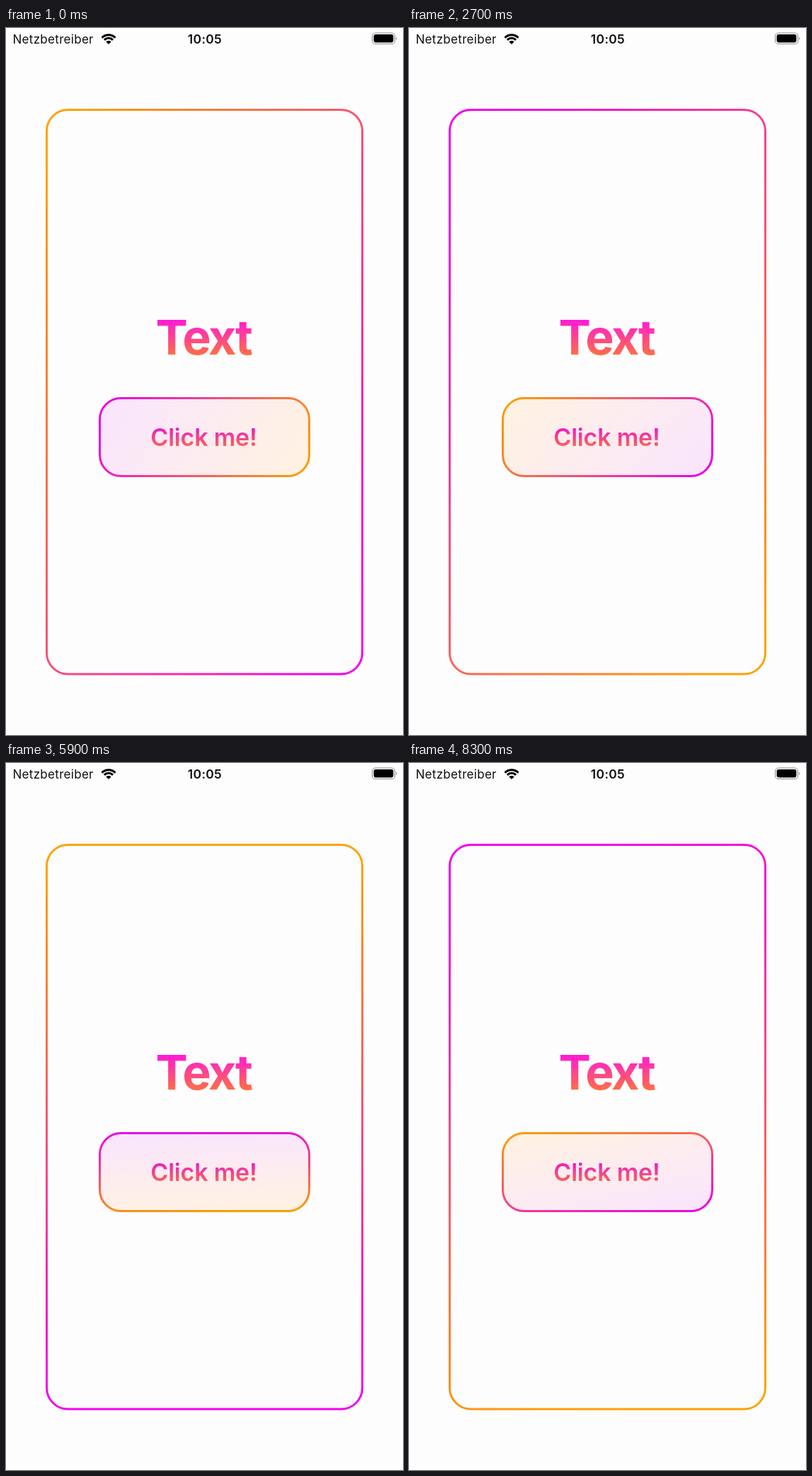
An HTML page that plays this animation: 561 px wide and 998 px high, repeating every 8.5 s.

```html
<!DOCTYPE html>
<html lang="en">
<head>
<meta charset="utf-8">
<title>Rotating gradient borders</title>
<style>
  html, body { margin: 0; width: 100%; height: 100%; overflow: hidden; background: #fefdfe; }
  svg { display: block; width: 561px; height: 998px; font-family: Inter, Roboto, sans-serif; }
  .bar { font-size: 17px; letter-spacing: .3px; fill: #111; }
  .bold { font-weight: 600; font-size: 17.5px; }
  .title { font-size: 68px; font-weight: 700; letter-spacing: -2.4px; }
  .label { font-size: 34px; font-weight: 600; letter-spacing: -.2px; }
  .mid { text-anchor: middle; }
</style>
</head>
<body>
<svg viewBox="0 0 561 998">
  <defs>
    <linearGradient id="cardLine" gradientUnits="userSpaceOnUse">
      <stop offset=".05" stop-color="#ffa200"/><stop offset=".95" stop-color="#f300ec"/>
    </linearGradient>
    <linearGradient id="btnLine" gradientUnits="userSpaceOnUse">
      <stop offset=".05" stop-color="#fa9d08"/><stop offset=".95" stop-color="#ea04e2"/>
    </linearGradient>
    <linearGradient id="btnFill" gradientUnits="userSpaceOnUse">
      <stop offset=".03" stop-color="#fff2e1"/><stop offset=".97" stop-color="#fae5fe"/>
    </linearGradient>
    <linearGradient id="titleInk" gradientUnits="userSpaceOnUse" x1="0" x2="0" y1="404" y2="478">
      <stop stop-color="#ff0cf0"/><stop offset="1" stop-color="#ff8a14"/>
    </linearGradient>
    <linearGradient id="labelInk" gradientUnits="userSpaceOnUse" x1="0" x2="0" y1="558" y2="604">
      <stop stop-color="#ea0ae0"/><stop offset="1" stop-color="#ff8a20"/>
    </linearGradient>
  </defs>

  <text class="bar" x="9.5" y="21.5">Netzbetreiber</text>
  <g fill="none" stroke="#000" stroke-width="3">
    <path d="M135.5 17.1 A13.4 13.4 0 0 1 154.5 17.1" transform="translate(0 -3.4)"/>
    <path d="M138.9 16.9 A8.6 8.6 0 0 1 151.1 16.9"/>
  </g>
  <path d="M145 23 L141.4 19.4 A5.1 5.1 0 0 1 148.6 19.4 Z"/>
  <text class="bar bold mid" x="281" y="21.7">10:05</text>
  <rect x="517.5" y="7" width="32" height="15.5" rx="4.6" fill="none" stroke="#8e8e90" stroke-width="1.1"/>
  <rect x="519.6" y="9.1" width="27.8" height="11.3" rx="2.8"/>
  <path d="M551.2 12.2 Q553.6 14.7 551.2 17.2 Z" fill="#8e8e90"/>

  <rect x="57.5" y="115.5" width="446" height="796.5" rx="30" fill="none" stroke="url(#cardLine)" stroke-width="3"/>
  <text class="title mid" x="279" y="461" fill="url(#titleInk)">Text</text>
  <g id="button">
    <rect x="132.5" y="522.5" width="296" height="110" rx="30" fill="url(#btnFill)" stroke="url(#btnLine)" stroke-width="3"/>
    <text class="label mid" x="279.5" y="590" fill="url(#labelInk)">Click me!</text>
  </g>
</svg>
<script>
const LOOP = 8500;
const START = 31, SPEED = 0.0705; // degrees, degrees per ms
const CARD = { x: 56, y: 114, w: 449, h: 799.5 };
const BUTTON = { x: 131, y: 521, w: 299, h: 113 };

// Runs of 200 ms ticks: [first tick, count]
const runs = [[0, 7], [1500, 7], [3000, 8], [4700, 8], [6400, 8], [8100, 2]];
const ticks = runs.flatMap(([t, n]) => Array.from({ length: n }, (_, i) => t + i * 200));

// Button opacity while pressed: [time, opacity]
const press = [[0, 1], [3700, .94], [3800, .78], [3900, .48], [4000, .25],
               [4200, .36], [4300, .7], [4400, .95], [4700, 1]];

const byId = id => document.getElementById(id);
const [cardLine, btnLine, btnFill, button] = ['cardLine', 'btnLine', 'btnFill', 'button'].map(byId);

// Gradient line through the box centre, reaching the corners as in CSS
function aim(grad, box, deg) {
  const a = deg * Math.PI / 180, c = Math.cos(a), s = Math.sin(a);
  const half = (Math.abs(c) * box.w + Math.abs(s) * box.h) / 2;
  const cx = box.x + box.w / 2, cy = box.y + box.h / 2;
  const ends = { x1: cx - c * half, y1: cy - s * half, x2: cx + c * half, y2: cy + s * half };
  for (const key in ends) grad.setAttribute(key, ends[key].toFixed(2));
}

function draw(t) {
  const angle = START + SPEED * ticks.findLast(k => k <= t);
  aim(cardLine, CARD, angle);
  aim(btnLine, BUTTON, angle + 180);
  aim(btnFill, BUTTON, angle + 180);
  button.setAttribute('opacity', press.findLast(p => p[0] <= t)[1]);
}

const begin = performance.now();
function loop() {
  draw((performance.now() - begin) % LOOP);
  requestAnimationFrame(loop);
}
draw(0);
requestAnimationFrame(loop);
</script>
</body>
</html>
```
